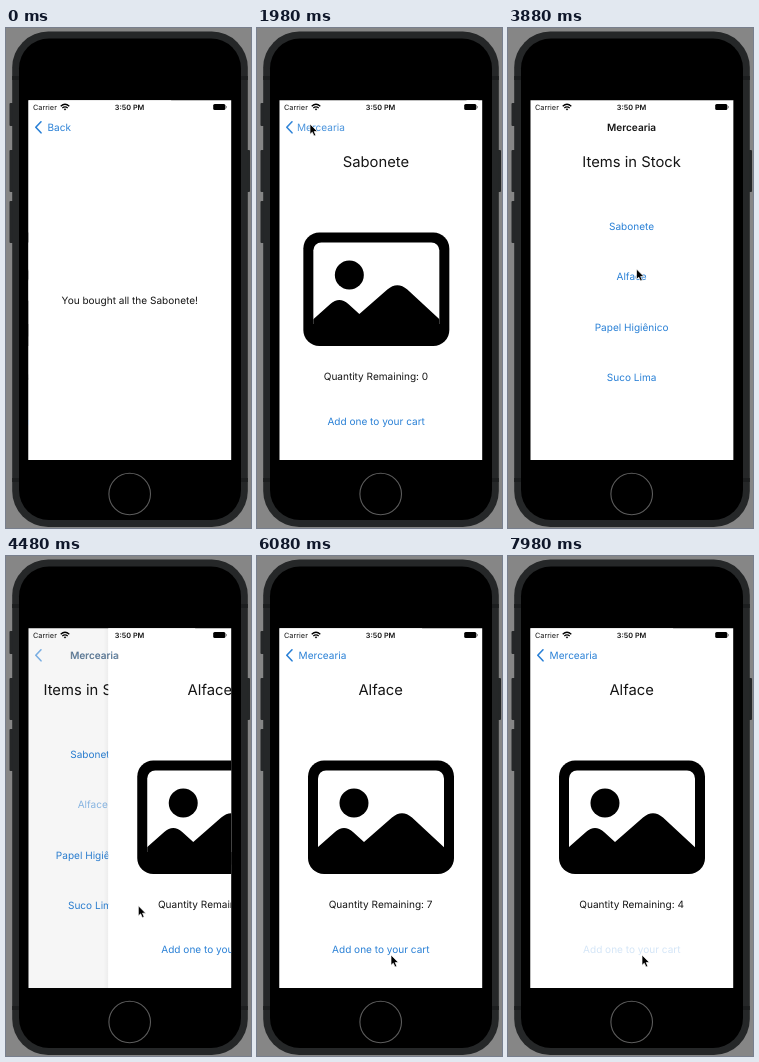
Animation of 245x500 px, one loop 8000 ms. Source, as an HTML page:

```html
<!DOCTYPE html>
<html lang="en">
<head>
<meta charset="utf-8">
<title>Shop navigation</title>
<style>
  html, body { margin: 0; width: 100%; height: 100%; overflow: hidden; background: #868686; }
  svg { display: block; width: 245px; height: 500px; }
  text { font: 10.05px Inter, "Liberation Sans", sans-serif; fill: #151515; text-anchor: middle; text-rendering: geometricPrecision; }
  .blue { fill: #2a80d6; }
  .head { font-size: 14.8px; }
  .bold { font-weight: 600; }
  .left { text-anchor: start; }
  .status { font-size: 7.3px; }
  .page { fill: #fff; }
  .dim { fill: #000; }
  .shade { fill: url(#shade); }
</style>
</head>
<body>
<svg viewBox="0 0 245 500">
  <defs>
    <clipPath id="screen"><rect x="22.500" y="72.300" width="202.700" height="359.700"/></clipPath>
    <clipPath id="photoInside"><rect x="61" y="214.500" width="126" height="94" rx="8"/></clipPath>
    <linearGradient id="shade">
      <stop offset="0" stop-opacity="0"/>
      <stop offset="1" stop-opacity=".1"/>
    </linearGradient>
  </defs>

  <g fill="#252728">
    <rect x="3.500" y="75" width="5" height="23" rx="1"/>
    <rect x="3.500" y="122" width="5" height="42" rx="1"/>
    <rect x="3.500" y="173" width="5" height="42" rx="1"/>
    <rect x="239" y="122" width="5" height="42" rx="1"/>
    <rect x="6.200" y="3.600" width="235.600" height="495.400" rx="36"/>
  </g>
  <path d="M6.200 50h235.600M6.200 452h235.600" stroke="#1c1e1f" stroke-width="4"/>
  <rect x="13" y="10.500" width="222" height="481.500" rx="30"/>
  <circle cx="123.700" cy="466" r="20.800" fill="none" stroke="#5c5c5c" stroke-width="1.100"/>

  <g clip-path="url(#screen)">
    <g id="list">
      <rect class="page" x="22" y="72" width="204" height="361"/>
      <text class="head" x="123.600" y="139">Items in Stock</text>
      <text class="blue" x="123.600" y="201.600">Sabonete</text>
      <text class="blue" x="123.600" y="252" id="alface">Alface</text>
      <text class="blue" x="123.600" y="302.600">Papel Higiênico</text>
      <text class="blue" x="123.600" y="353">Suco Lima</text>
      <rect class="dim" x="22" y="72" width="204" height="361"/>
    </g>
    <g id="detail">
      <rect class="shade" x="17" y="72" width="5" height="361"/>
      <rect class="page" x="22" y="72" width="204" height="361"/>
      <text class="head" x="123.600" y="139" id="product"></text>
      <rect x="51" y="204.500" width="146" height="113.500" rx="16"/>
      <g clip-path="url(#photoInside)">
        <rect class="page" x="51" y="204" width="146" height="92"/>
        <circle cx="97" cy="247" r="14.500"/>
        <path d="M60 292L78 276Q87 268 96 276L107 286L135 261.500Q145 253 155 261.500L189 293V310H60Z"/>
      </g>
      <text x="123.600" y="351.500" id="quantity"></text>
      <text class="blue" x="123.800" y="396.700" id="add">Add one to your cart</text>
      <rect class="dim" x="22" y="72" width="204" height="361"/>
    </g>
    <g id="bought">
      <rect class="shade" x="17" y="72" width="5" height="361"/>
      <rect class="page" x="22" y="72" width="204" height="361"/>
      <text x="123.800" y="276">You bought all the Sabonete!</text>
    </g>

    <path id="chevron" d="M35 93.800L29.800 99.300L35 104.800" fill="none" stroke="#2a80d6" stroke-width="1.600" stroke-linecap="round" stroke-linejoin="round"/>
    <text class="blue left" y="103" id="back">Back</text>
    <text class="blue" y="103" id="crumb">Mercearia</text>
    <text class="bold" y="103" id="title">Mercearia</text>

    <text class="status left" x="27" y="82">Carrier</text>
    <text class="status bold" x="123.600" y="82">3:50 PM</text>
    <g fill="none" stroke="#000" stroke-width="1.300">
      <path d="M54.700 78.200Q59 74.300 63.300 78.200M56.300 80Q59 77.700 61.700 80"/>
      <path d="M59 82.500L57.700 81.100Q59 80.100 60.300 81.100Z" fill="#000" stroke="none"/>
      <rect x="207.200" y="76" width="12.200" height="6" rx="1.500" fill="#000" stroke="none"/>
      <path d="M220.400 78v2.200" stroke="#777" stroke-width=".8"/>
    </g>
  </g>

  <path id="cursor" d="M0 0V10.300L2.300 8.200L4 12L5.800 11.200L4.200 7.500H7.400Z" stroke="#fff" stroke-width=".8" stroke-opacity=".85"/>
</svg>
<script>
const LOOP = 8000, STEP = 100, WIDTH = 203, CENTER = 123.6;
const el = id => document.getElementById(id);
const mix = (a, b, p) => a + (b - a) * p;

// Time, x, y of the pointer tip
const route = [
  [180, 145, 118], [280, 53.5, 65], [380, 54, 65], [680, 50, 91], [780, 50, 91],
  [1080, 53, 96], [2980, 53, 96], [3880, 128.5, 241], [4080, 131, 249],
  [4280, 131, 249], [4580, 133, 400], [4680, 134, 459], [4880, 134, 440],
  [4980, 134, 424], [5180, 133.5, 412], [5680, 133, 400], [5880, 133, 400], [6080, 134, 399]
];
const taps = [6280, 6780, 7280, 7980];
const HOLD = 100;

function spring(ms) {
  const x = Math.max(0, ms) * 0.012;
  return 1 - (1 + x) * Math.exp(-x);
}

function pressed(t, down, up) {
  if (t < down) return 1;
  return t < up ? 0.2 : Math.min(1, 0.2 + 0.8 * (t - up) / 400);
}

function place(id, x, dim = 0, shade = 0) {
  const page = el(id);
  page.setAttribute('transform', `translate(${x})`);
  page.style.display = x < WIDTH ? '' : 'none';
  for (const part of page.querySelectorAll('.dim')) part.style.opacity = dim;
  for (const part of page.querySelectorAll('.shade')) part.style.opacity = shade;
}

function label(id, x, opacity) {
  el(id).setAttribute('x', x);
  el(id).style.opacity = opacity;
}

// q runs from 0 (top page covers) to 1 (top page gone)
function slide(under, over, q) {
  const depth = (1 - q) ** 2;
  place(under, -0.3 * WIDTH * (1 - q), 0.1 * depth);
  place(over, WIDTH * q, 0, depth);
}

function drawPages(t) {
  if (t < 2151) {
    const q = spring(t - 1628);
    place('list', WIDTH);
    slide('detail', 'bought', q);
    label('back', 41.5 + 20 * q, t < 1580 ? 1 : 0.3 * (1 - q));
    label('crumb', mix(45, 65.5, q), q * q);
    label('title', CENTER, 0);
    el('chevron').style.opacity = pressed(t, 1580, 1600);
  } else {
    const q = t < 4000 ? spring(t - 2151) : 1 - spring(t - 4310);
    const x = mix(65.5, CENTER, q);
    place('bought', WIDTH);
    slide('list', 'detail', q);
    label('back', 41.5, 0);
    label('crumb', x, 1 - q);
    label('title', x, q);
    el('chevron').style.opacity = 1 - q;
  }
}

function drawShop(t) {
  const first = t < 4000;
  const sold = taps.filter(tap => t >= tap + HOLD).length;
  const tap = taps.filter(tap => t >= tap).pop() ?? Infinity;
  el('product').textContent = first ? 'Sabonete' : 'Alface';
  el('quantity').textContent = 'Quantity Remaining: ' + (first ? 0 : 7 - sold);
  el('add').style.opacity = pressed(t, tap, tap + HOLD);
  el('alface').style.opacity = pressed(t, 4180, 4310);
}

function drawCursor(t) {
  const next = route.findIndex(key => key[0] > t);
  const b = route.at(next), a = next > 0 ? route[next - 1] : b;
  const p = a === b ? 0 : (t - a[0]) / (b[0] - a[0]);
  el('cursor').setAttribute('transform', `translate(${mix(a[1], b[1], p)} ${mix(a[2], b[2], p)})`);
  el('cursor').style.display = t < route[0][0] ? 'none' : '';
}

function frame() {
  // The screen refreshes ten times a second
  const t = Math.floor((performance.now() % LOOP + 20) / STEP) * STEP - 20;
  drawPages(t);
  drawShop(t);
  drawCursor(t);
  requestAnimationFrame(frame);
}
frame();
</script>
</body>
</html>
```
